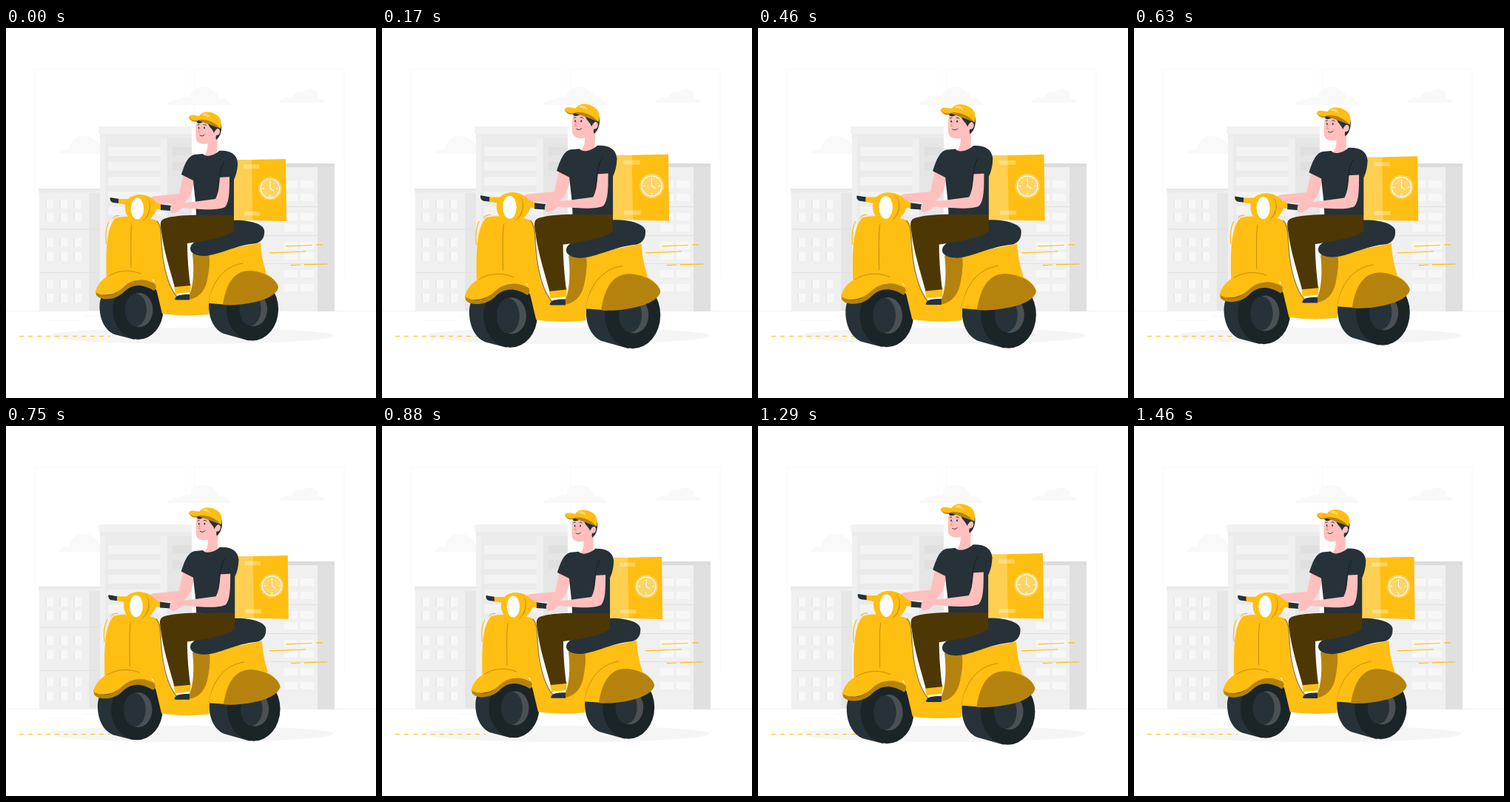
Animation, 500 px wide and 500 px high, one loop 1500 ms. Source, as an HTML page:

```html
<!DOCTYPE html>
<html lang="en">
<head>
<meta charset="utf-8">
<title>Scooter delivery</title>
<style>
html, body { margin: 0; width: 100%; height: 100%; overflow: hidden; background: #fff; }
svg { display: block; width: 100%; height: 100%; }
.y { fill: #ffbe12; }
.o { fill: #b5830d; }
.d { fill: #263238; }
.k { fill: #1b2427; }
.p { fill: #ffc0bd; }
.b { fill: #4d3705; }
.line { fill: none; stroke-linecap: round; }
</style>
</head>
<body>
<svg viewBox="0 0 500 500">
  <g fill="none" stroke="#f9f9f9">
    <path d="M39 382V55.500H242.500V140M254.500 180V55.500H457V338"/>
    <path d="M0 382.500H500" stroke="#f2f2f2"/>
    <path d="M55 395.500H103M106 389.500H128" stroke="#f8f8f8"/>
  </g>
  <g fill="#f9f9f9">
    <path d="M217 104C220 98 228 96 234 97C239 92 245 92 249 93C251 82 261 79 268 80C278 80 286 87 287 95C296 94 302 98 303 104Z"/>
    <path d="M368 101C371 95 380 93 386 95C388 86 397 86 401 87C407 82 418 81 421 89C421 92 421 94 422 96C427 95 431 98 432 101Z"/>
    <path d="M71 170C74 165 79 162 86 164C86 150 98 145 107 146C117 147 123 153 126 158H132V170Z"/>
  </g>
  <g id="city">
    <path fill="#f0f0f0" d="M127 137H218V382H127Z"/>
    <path fill="#e6e6e6" d="M218 137H251V382H218Z"/>
    <path fill="#ebebeb" d="M127 143H251V149H127ZM134 149H209V382H134Z"/>
    <path fill="#f2f2f2" d="M125 133H251V143H125Z"/>
    <path fill="#e0e0e0" d="M225 161H251V172H225ZM225 181H251V193H225Z"/>
    <path fill="#f0f0f0" d="M45 223H112V382H45Z"/>
    <path fill="#e6e6e6" d="M112 223H127V382H112ZM44 217H127V219H44Z"/>
    <path fill="#ededed" d="M44 219H127V223H44Z"/>
    <path fill="#e0e0e0" d="M46 271.500H127V272.500H46ZM46 330H127V331H46Z"/>
    <path fill="#f0f0f0" d="M340 185H421V383H340Z"/>
    <path fill="#e0e0e0" d="M421 185H444V383H421Z"/>
    <path fill="#dcdcdc" d="M340 183H444V188H340Z"/>
    <path fill="#e0e0e0" d="M340 241H444V242H340ZM340 280H444V281H340ZM340 318H444V319H340Z"/>
  </g>
  <ellipse cx="250" cy="416" rx="193" ry="11" fill="#f5f5f5"/>
  <g fill="none" stroke="#ffbe12" stroke-width="1.200">
    <path d="M18 416.500H140" stroke-dasharray="6"/>
    <path d="M378 294.800L414 293.500M419 293L428 292.800M356 303.800L405 302M385 320.600L398 320M403 319.800L434 318.800"/>
  </g>

  <g id="rider">
    <path class="line" stroke="#ffbe12" stroke-width="1.200" d="M135.500 291C134 279 136 268 139 262M145 257Q148 253 153 253.500"/>

    <!-- parcel box -->
    <path fill="#ffcf52" d="M305 178L333 178V260L305 260Z"/>
    <path class="y" d="M332 178L378 177L379 261L333 260Z"/>
    <path fill="#fff" opacity=".3" d="M321 184.500H342V190H321ZM322 248H343V253.500H322Z"/>
    <circle cx="357" cy="217" r="15.500" fill="#ffd466"/>
    <g class="line" stroke="#fff">
      <circle cx="357" cy="217" r="12.700" stroke-width="1.200"/>
      <path d="M357 207.500V217L361.500 220M357 226V228M346 217H348.500M365.500 217H368"/>
    </g>

    <!-- wheels -->
    <g id="wheels"></g>

    <!-- scooter body -->
    <path fill="#fafafa" d="M208 266L256 290L254 350L240 366L226 360L212 325Z"/>
    <path class="o" d="M252 305H277L272 352C268 364 256 369 244 367C253 357 255 330 252 305Z"/>
    <path class="y" d="M136 340C135 305 135 269 148 257C165 253 190 255 203 260C211 268 207 290 212 317C216 341 224 362 237 367C254 369 268 361 272 340C275 325 276 315 274 304L344 290C345 307 347 315 351 329C355 340 310 368 274 372V387C255 389 230 389 211 386L200 340Z"/>
    <path class="line" stroke="#b5830d" stroke-width="1.600" d="M204 261C212 269 208 290 213 317C217 339 223 356 233 365"/>
    <path class="line" stroke="#b5830d" stroke-width=".8" d="M170 266C168 282 169 304 169 323M274 371C278 344 293 322 320 318"/>
    <path class="y" d="M274 372C276 347 297 322 325 325C350 326 367 340 368 352L300 374Z"/>
    <path class="o" d="M293 374C297 349 306 328 329 328C350 329 366 340 368 350C367 360 350 368 333 371C319 374 304 375 293 374Z"/>
    <path class="o" d="M121 355C132 366 148 361 157 351C170 338 190 337 201 345C204 349 203 353 200 355C181 343 168 348 159 357C148 368 128 369 122 361Z"/>
    <path class="y" d="M121 357C124 342 139 330 160 329C181 328 197 336 202 346C187 337 171 339 159 350C148 361 132 364 121 357Z"/>
    <path class="line" stroke="#b5830d" stroke-width=".8" d="M139 335C151 327 169 326 182 332"/>

    <!-- saddle and leg -->
    <path class="d" d="M250 294C254 289 258 287 263 286L307 260C326 259 347 264 349 273C350 282 346 289 338 291C308 294 288 307 268 308C255 308 246 303 250 294Z"/>
    <path class="d" d="M228 367C229 361 235 360 248 360V367.500H230Z"/>
    <path class="y" d="M227 348L250 346L249 357L229 359Z"/>
    <path class="b" d="M308 252V274C297 283 274 287 245 291C245 312 247 331 249 348L228 350C221 324 213 300 210 275C208 264 208 259 216 257C233 252 270 252 308 252Z"/>

    <!-- far arm, head and torso -->
    <path class="p" d="M240 197L255 201C253 216 250 229 242 235C226 239 207 238 196 235C194 231 196 227 202 227L234 224Z"/>
    <path class="p" d="M272 148H286L285 168C283 176 272 178 267 173C273 167 273 159 272 148Z"/>
    <path class="d" d="M266 170C269 175 281 173 288 166C302 165 312 170 313 182C313 193 310 201 308 205L308 253H257C257 236 254 220 253 206L237 198C241 186 245 173 255 171Z"/>
    <path class="d" d="M279 126L291 131C292 139 289 148 284 151Z"/>
    <path class="p" d="M258 126C256 134 256 145 257 151C260 158 271 158 277 154C282 150 284 147 284 145C289 146 291 138 287 136C285 135 283 138 282 139L281 127Z"/>
    <path class="d" d="M256 123C257 128 260 130 264 128C268 126 271 127 273 129C275 135 279 136 281 142C284 135 287 135 289 137L291 130C281 123 267 120 256 123Z"/>
    <path class="o" d="M247 121C250 127 256 128 260 125L290 136L288 126L260 120Z"/>
    <path class="y" d="M247 120C249 116.500 255 118 261 119C264 113 275 112 282 116C291 120 292 128 290 136C281 126 270 123 261 124C255 126 249 125 247 120Z"/>
    <path fill="#ffd76e" d="M264 117C269 114 274 115 276 121C271 119 268 118 264 117Z"/>
    <path class="line" stroke="#263238" stroke-width=".9" d="M262 145Q266 147.500 268.500 144M259 131L261 130.500M267 130.500Q269 129.500 270.500 131.500"/>
    <path class="line" stroke="#ed847e" stroke-width=".8" d="M262 136L260 141H262.500"/>
    <ellipse class="d" cx="260.500" cy="135" rx=".8" ry="1.400"/>
    <ellipse class="d" cx="268" cy="135" rx=".9" ry="1.400"/>

    <!-- handlebar -->
    <path class="d" d="M141 229L153 231V237L145 236C141 235 140 231 141 229ZM207 238L223 240V247L209 246Z"/>
    <path class="y" d="M152 231L166 231L164 239L152 237ZM194 231L209 238V245L192 244Z"/>
    <path class="y" d="M161 243C161 231 170 225 182 225C195 226 203 233 205 241C201 254 194 262 181 262C168 262 161 254 161 243Z"/>
    <path fill="#d59b0f" d="M186 227C198 232 195 253 184 261C197 256 200 232 186 227Z"/>
    <ellipse cx="177.500" cy="244" rx="8.700" ry="14.500" fill="#fff"/>

    <!-- near arm -->
    <path class="p" d="M289 200H302C302 220 302 235 296 242C284 248 254 244 238 243C233 249 226 252 223 249C220 244 223 237 230 235C236 234 241 236 246 236L283 231C287 224 288 214 289 200Z"/>
    <path class="d" d="M287 202C288 188 291 179 299 174L313 182C312 191 310 199 305 201Z"/>
    <path class="line" stroke="#10181b" stroke-width=".7" d="M286 221C288 207 288 190 295 181"/>
  </g>
</svg>
<script>
const make = (tag, attrs, parent) => {
  const node = document.createElementNS("http://www.w3.org/2000/svg", tag);
  for (const key in attrs) node.setAttribute(key, attrs[key]);
  parent.append(node);
};
const city = document.getElementById("city");
const wheels = document.getElementById("wheels");
const rider = document.getElementById("rider");

const pane = (x, y, width, height, fill = "#f7f7f7") =>
  make("rect", { x, y, width, height, fill }, city);
for (const y of [232, 250, 284, 303, 340, 359])
  for (const x of [53, 72, 91]) {
    pane(x, y, 11, 12);
    pane(x, y, 2, 12, "#e8e8e8");
  }
for (let y = 161; y < 370; y += 20) pane(138, y, 71, 12, "#f3f3f3");
for (const y of [206, 224, 250, 265, 289, 303, 327, 346])
  for (const x of [376, 398]) pane(x, y, 18, 10);

function wheel(x, y, rx, ry, left) {
  const ellipse = (cx, a, b, attrs) => make("ellipse", { cx, cy: y, rx: a, ry: b, ...attrs }, wheels);
  make("path", {
    class: "d",
    d: `M${x} ${y - ry}H${left + 29}C${left + 10} ${y - ry + 4} ${left} ${y - 20} ${left} ${y - 5}` +
       `C${left} ${y + 14} ${left + 8} ${y + 28} ${left + 20} ${y + 33}L${x - 5} ${y + ry}Z`
  }, wheels);
  ellipse(x, rx, ry, { class: "k" });
  ellipse(x + 2, 18, 23, { fill: "#4a5053" });
  ellipse(x - 3, 14.500, 22, { class: "d" });
}
wheel(178.500, 381, 34, 40, 126.500);
wheel(333, 380, 35, 42.500, 274);

// Two uneven beats per loop: [time in ms, scale]
const beats = [[0, 1], [245, 1.1], [890, 1], [1135, 1.1], [1475, 1], [1500, 1]];
function scaleAt(t) {
  const i = beats.findIndex(([time]) => time > t);
  const [t0, s0] = beats[i - 1], [t1, s1] = beats[i];
  return s0 + (s1 - s0) * (t - t0) / (t1 - t0);
}
function draw() {
  const s = scaleAt(performance.now() % 1500);
  rider.setAttribute("transform", `translate(250 268) scale(${s}) translate(-250 -268)`);
  requestAnimationFrame(draw);
}
draw();
</script>
</body>
</html>
```
